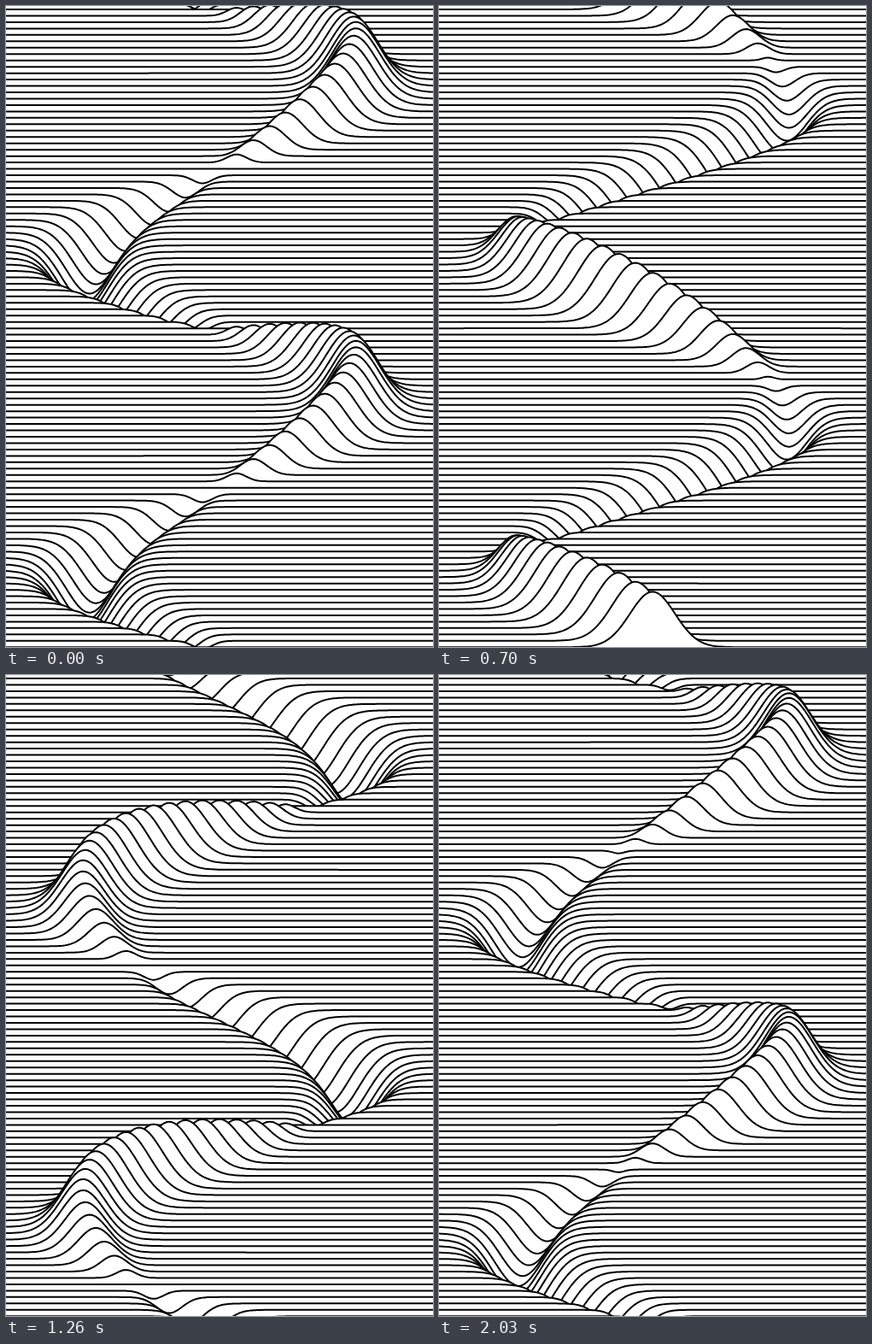
Recreate the animation shown at these times as an HTML page. Size 500x750 px, loop 2.1 s.

```html
<!DOCTYPE html>
<html lang="en">
<head>
<meta charset="utf-8">
<title>Travelling ridge</title>
<style>
  html, body { margin: 0; width: 100%; height: 100%; overflow: hidden; background: #fff; }
  svg { display: block; width: 100%; height: 100%; }
  path { fill: #fff; stroke: #000; stroke-width: 2; stroke-linejoin: round; }
</style>
</head>
<body>
<svg viewBox="0 0 500 750"></svg>
<script>
const WIDTH = 500, HEIGHT = 750;
const LOOP = 2100, STEP = 70;
const FIRST = -11, LAST = 100, PERIOD = 50;
const TOP = 4, SPACING = 7.4625;
const SWAY = 160, LIFT = 75, SPREAD = 39.5;
const TAU = 2 * Math.PI;

const svg = document.querySelector('svg');
const lines = [];
for (let i = FIRST; i <= LAST; i++) {
  const path = document.createElementNS('http://www.w3.org/2000/svg', 'path');
  svg.append(path);
  lines.push({ path, i });
}

// Each line is filled below, so nearer lines hide those behind them.
function outline(i, phase) {
  const angle = TAU * i / PERIOD;
  const base = TOP + i * SPACING;
  const center = WIDTH / 2 + SWAY * Math.sin(angle);
  const swell = Math.sin(angle + phase);
  // Weak bumps are narrower than strong ones.
  const spread = SPREAD * Math.abs(swell) ** 0.43 + 1e-3;
  let d = `M-6 ${HEIGHT + 12}`;
  for (let x = -6; x <= WIDTH + 6; x += 2) {
    const y = base - LIFT * swell * Math.exp(-(((x - center) / spread) ** 2));
    d += `L${x} ${y.toFixed(2)}`;
  }
  return d + `V${HEIGHT + 12}Z`;
}

function draw(time) {
  const phase = TAU * time / LOOP;
  for (const { path, i } of lines) path.setAttribute('d', outline(i, phase));
}

const start = performance.now();
let shown = -1;
function tick() {
  const elapsed = (performance.now() - start) % LOOP;
  const time = Math.floor(elapsed / STEP) * STEP;
  if (time !== shown) draw(shown = time);
  requestAnimationFrame(tick);
}
tick();
</script>
</body>
</html>
```
